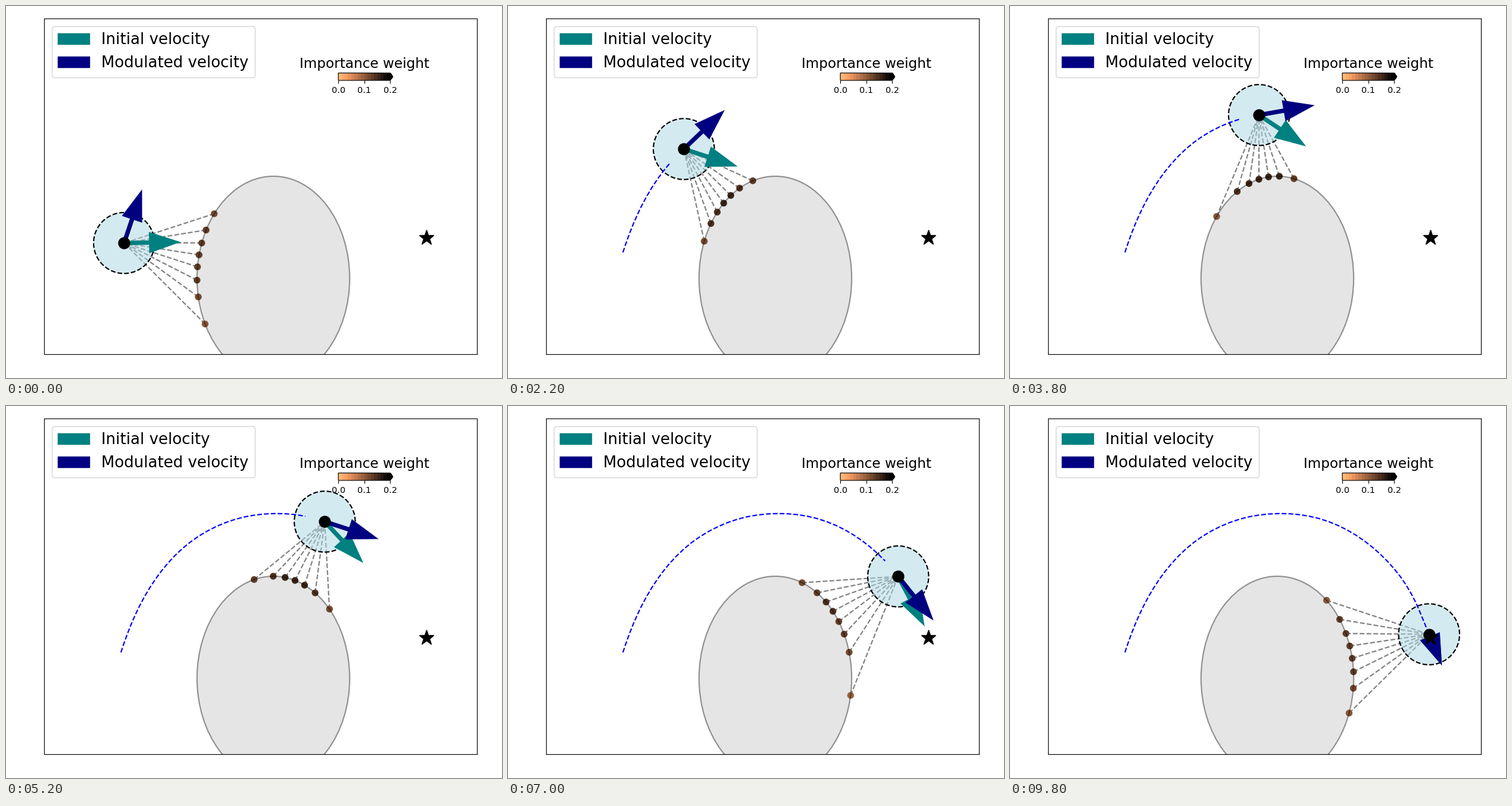
A matplotlib script that plays this animation: 833x625 px, repeating every 10000 ms.

```python
import numpy as np
import matplotlib.pyplot as plt
from matplotlib.animation import FuncAnimation
from matplotlib.cm import ScalarMappable
from matplotlib.collections import LineCollection
from matplotlib.colors import ListedColormap, Normalize
from matplotlib.patches import Ellipse, Patch, Polygon

W, H, DPI = 833, 625, 625 / 6
FRAMES, INTERVAL = 50, 200
LEFT, RIGHT, TOP, BOTTOM = 64, 791, 21, 585

GOAL = np.array([706.2, 389.3])
CENTER = np.array([449.0, 457.5])
RADII = np.array([128.2, 171.5])
MARGIN = 51.2
RAYS = np.radians(np.arange(0, 360, 9))

# step, x, y, heading in degrees, speed per step
KNOTS = [
    (1, 198.3, 398.2, 71.0, 17),
    (12, 295.3, 240.3, 41.8, 17),
    (20, 418.2, 183.2, 7.7, 17),
    (27, 535.3, 194.3, -20.2, 17),
    (36, 655.3, 286.3, -52.9, 17),
    (40, 686.7, 341.9, -67.6, 12),
]


def hermite(a, b, k):
    """Point at step k on the cubic between two knots."""
    span = b[0] - a[0]
    s = (k - a[0]) / span
    ends = [np.array(n[1:3], float) for n in (a, b)]
    tans = []
    for n in (a, b):
        ang = np.radians(n[3])
        tans.append(span * n[4] * np.array([np.cos(ang), -np.sin(ang)]))
    blend = s * s * (3 - 2 * s)
    return (ends[0] * (1 - blend) + ends[1] * blend
            + tans[0] * s * (1 - s) ** 2 - tans[1] * s * s * (1 - s))


def position(k):
    if k == 0:
        return np.array([193.0, 414.0])
    for a, b in zip(KNOTS, KNOTS[1:]):
        if k <= b[0]:
            return hermite(a, b, k)
    last = KNOTS[-1]
    return GOAL + (np.array(last[1:3]) - GOAL) * 0.81 ** (k - last[0])


PATH = np.array([position(k) for k in range(FRAMES + 1)])


def cast_rays(origin):
    """First hits of the rays on the obstacle, with their distances."""
    dirs = np.column_stack([np.cos(RAYS), np.sin(RAYS)])
    o, u = (origin - CENTER) / RADII, dirs / RADII
    a, b, c = (u * u).sum(1), u @ o, o @ o - 1
    disc = b * b - a * c
    t = (-b - np.sqrt(np.maximum(disc, 0))) / a
    hit = (disc > 0) & (t > 0)
    return origin + dirs[hit] * t[hit, None], t[hit]


def arrow(start, direction, shaft, half=3.7, head=53, wing=17.9):
    d = direction / np.hypot(*direction)
    n = np.array([-d[1], d[0]])
    base = start + d * shaft
    return [start + n * half, base + n * half, base + n * wing,
            base + d * head,
            base - n * wing, base - n * half, start - n * half]


plt.rcParams["font.family"] = "DejaVu Sans"
fig = plt.figure(figsize=(W / DPI, H / DPI), dpi=DPI, facecolor="white")
ax = fig.add_axes([LEFT / W, 1 - BOTTOM / H, (RIGHT - LEFT) / W, (BOTTOM - TOP) / H])
ax.set(xlim=(LEFT, RIGHT), ylim=(BOTTOM, TOP), xticks=[], yticks=[])

cmap = ListedColormap(plt.get_cmap("copper_r")(np.linspace(0.08, 1, 16)))
norm = Normalize(0, 0.2)

size = 2 * RADII
ax.add_patch(Ellipse(CENTER, *size, fc="#e5e5e5", ec="none", zorder=1))
ax.add_patch(Ellipse(CENTER, *size, fc="none", ec=(0, 0, 0, 0.4), lw=1.5, zorder=4))
ax.plot(*GOAL, "k*", ms=18, zorder=10)

links = ax.add_collection(
    LineCollection([], colors="gray", linestyles="--", linewidths=1.5, zorder=2),
    autolim=False)
hits = ax.scatter([], [], s=62, linewidths=0, zorder=3)
# negative height: the dashes run counter-clockwise although y points down
margin = ax.add_patch(Ellipse(PATH[1], 2 * MARGIN, -2 * MARGIN,
                              fc=(*(np.array([173, 216, 230]) / 255), 0.52),
                              ec="black", ls="--", lw=1.5, zorder=5))
trail, = ax.plot([], [], "--", color="blue", lw=1.5, zorder=6)
initial = ax.add_patch(Polygon([(0, 0)] * 3, color="teal", lw=0, zorder=7))
modulated = ax.add_patch(Polygon([(0, 0)] * 3, color="navy", lw=0, zorder=8))
agent, = ax.plot([], [], "ko", ms=13, zorder=9)

ax.legend(handles=[Patch(color="teal", label="Initial velocity"),
                   Patch(color="navy", label="Modulated velocity")],
          loc="upper left", fontsize=18)

cax = fig.add_axes([0.67, 0.8, 0.11, 0.02])
fig.colorbar(ScalarMappable(norm, cmap), cax=cax, orientation="horizontal",
             extend="max", ticks=[0, 0.1, 0.2])
cax.set_title("Importance weight", fontsize=16)


def update(k):
    here, sensed = PATH[k + 1], PATH[max(k, 1)]
    points, dist = cast_rays(sensed)
    weights = dist ** -0.7
    weights /= weights.sum()

    links.set_segments([[p, here] for p in points])
    hits.set_offsets(points)
    hits.set_facecolors(cmap(norm(weights)))
    margin.set_center(here)
    trail.set_data(PATH[:k, 0], PATH[:k, 1])
    agent.set_data([here[0]], [here[1]])

    shaft = 42 * min(1, np.hypot(*(GOAL - sensed)) / 88)
    initial.set_xy(arrow(here, GOAL - sensed, shaft))
    modulated.set_xy(arrow(here, here - PATH[k], shaft))
    return links, hits, margin, trail, agent, initial, modulated


anim = FuncAnimation(fig, update, frames=FRAMES, interval=INTERVAL,
                     init_func=lambda: update(0), repeat=True, repeat_delay=0)
plt.show()
```
